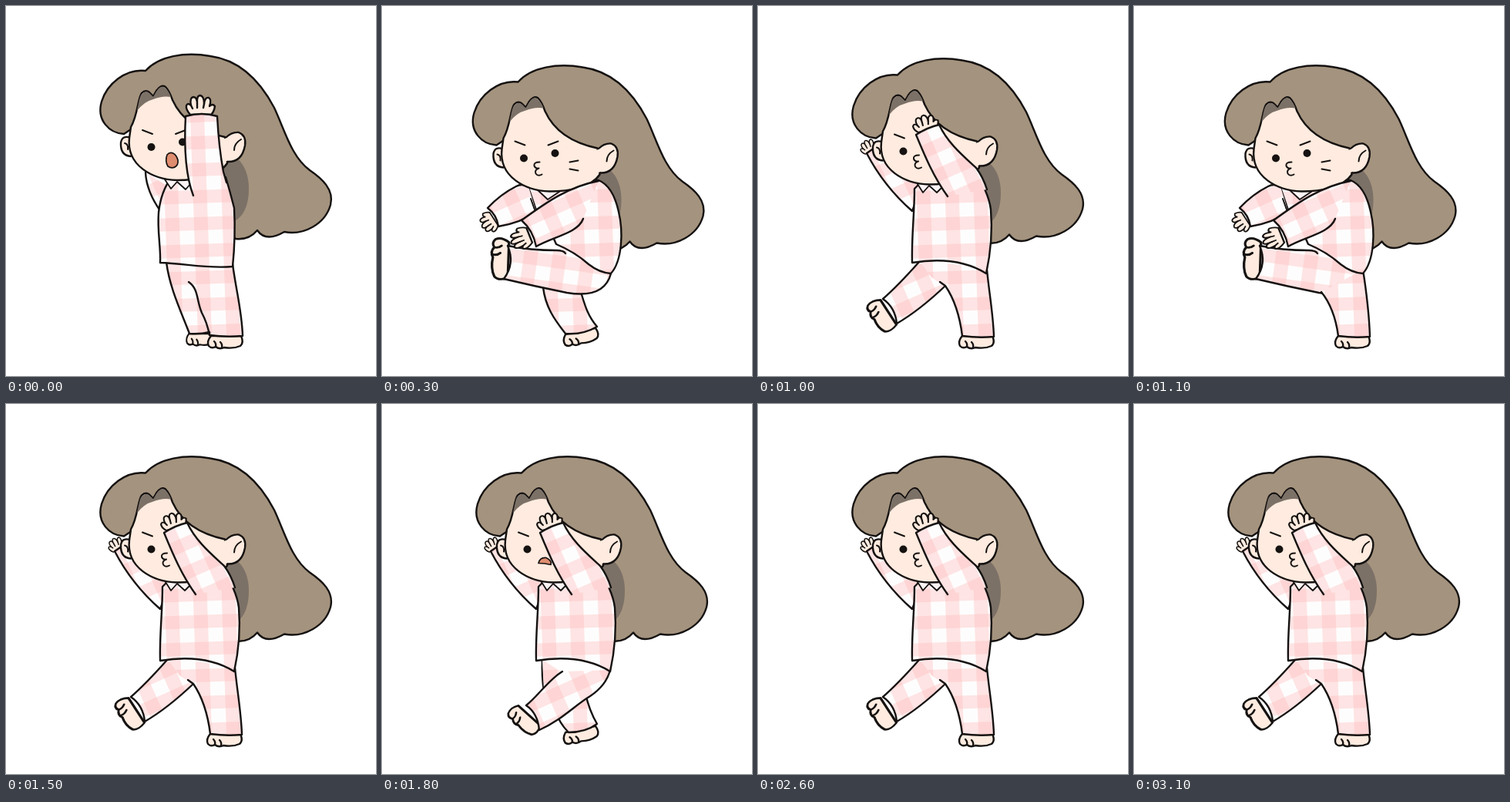
An HTML page that plays this animation: 480 px wide and 480 px high, repeating every 3.2 s.

```html
<!DOCTYPE html>
<html lang="en">
<head>
<meta charset="utf-8">
<title>Pyjama kicks</title>
<style>
html, body { margin: 0; width: 100%; height: 100%; overflow: hidden; background: #fff; }
svg { display: block; width: 100vw; height: 100vh; }
path { fill: none; stroke: #151211; stroke-width: 2.4; stroke-linecap: round; stroke-linejoin: round; }
.hair { fill: #a4937e; }
.shade { fill: #7c7167; stroke: none; }
.skin { fill: #ffebdf; }
.cloth { fill: url(#plaid); }
.tilted { fill: url(#tilted); }
.slanted { fill: url(#slanted); }
.collar { fill: #fdf5f5; stroke-width: 1.8; }
.mouth { fill: #df8d6f; stroke-width: 1.7; }
.thin { stroke-width: 2; }
.bare { stroke: none; }
</style>
</head>
<body>
<svg viewBox="0 0 480 480">
  <defs>
    <pattern id="plaid" width="37" height="35" patternUnits="userSpaceOnUse" patternTransform="translate(12 2) rotate(-2)">
      <rect width="37" height="35" fill="#fefdfd"/>
      <g fill="#ffb8b8" fill-opacity=".37">
        <rect width="18" height="35"/>
        <rect width="37" height="17"/>
      </g>
    </pattern>
    <pattern id="tilted" href="#plaid" patternTransform="translate(8 4) rotate(-24)"/>
    <pattern id="slanted" href="#plaid" patternTransform="translate(4 9) rotate(8)"/>

    <!-- both drawn around the wrist or ankle -->
    <g id="hand">
      <path class="skin" d="M-14 0Q-20-7-19-12Q-17-16-13-12Q-15-22-10-23Q-5-23-5-14Q-6-25-1-25Q4-24 4-14Q5-23 10-22Q14-20 11-11Q15-15 18-11Q17-4 13 0Z"/>
      <path d="M-13-12L-11-8M-5-14V-9M4-14L3-9"/>
    </g>
    <g id="foot">
      <path class="skin" d="M-19 0Q-25 7-22 13Q-18 17-13 14Q-8 18-2 15Q10 17 19 13Q24 9 20 0Z"/>
      <path d="M-15 7Q-12 10-13 14M-7 8Q-4 11-5 15"/>
    </g>
    <g id="kickLeg">
      <use href="#foot" transform="translate(164 329) rotate(92) scale(1.18 1.35)"/>
      <path class="bare slanted" d="M226 305L238 322L297 347L275 325Z"/>
      <path class="slanted" d="M238 321Q236 317 226 317Q192 317 163 311Q173 334 158 354Q200 364 240 372C276 378 292 366 297 347"/>
    </g>
  </defs>

  <g class="head">
    <path class="hair" d="M181 84C155 81 131 101 124 124C117 148 134 165 153 166L162 160L230 240L298 302Q315 304 326 291Q337 307 361 293C386 298 414 283 421 258C426 238 410 224 394 213C370 195 362 162 348 132C328 94 302 70 265 65C232 59 198 65 181 84Z"/>
    <path class="shade" d="M280 191C303 191 315 212 315 237C315 264 304 283 280 283Z"/>
  </g>

  <!-- legs -->
  <g data-on="s">
    <use href="#foot" transform="translate(253 425) scale(.82 .95)"/>
    <use href="#foot" transform="translate(285 428)"/>
    <path class="cloth" d="M208 332C212 365 227 396 238 425Q252 426 264 423L264 427Q285 430 307 428C306 396 299 372 294 335"/>
    <path d="M237 358C250 367 247 382 254 398Q261 411 264 427"/>
  </g>
  <g data-on="A">
    <use href="#foot" transform="translate(257 422) rotate(-12) scale(1.02)"/>
    <path class="cloth" d="M208 332Q207 353 210 372M225 398Q230 414 242 426Q264 426 279 415Q269 398 264 376"/>
    <use href="#foot" transform="translate(191 404) rotate(42) scale(1 1.25)"/>
    <path class="bare cloth" d="M208 332L210 372L234 348Z"/>
    <path class="tilted" d="M234 347C217 357 203 378 187 391Q202 401 204 423C233 410 250 391 270 379Q291 365 296 345"/>
  </g>
  <g data-on="B">
    <use href="#foot" transform="translate(169 397) rotate(57) scale(.98 1.35)"/>
    <use href="#foot" transform="translate(284 428)"/>
    <path class="tilted" d="M209 332C193 350 179 365 162 380Q178 391 180 412C204 398 223 382 243 363"/>
    <path class="bare cloth" d="M209 330L297 340V350L243 364L225 352Z"/>
    <path class="cloth" d="M236 358L243 363C256 382 262 404 265 428Q286 431 306 429C305 398 300 374 297 342"/>
  </g>
  <g data-on="K">
    <use href="#foot" transform="translate(257 422) rotate(-12) scale(1.02)"/>
    <path class="cloth" d="M209 365C212 390 223 406 238 425Q260 427 279 416C266 401 263 387 257 368"/>
    <use href="#kickLeg"/>
  </g>
  <g data-on="k">
    <use href="#kickLeg"/>
    <use href="#foot" transform="translate(284 428)"/>
    <path class="cloth" d="M243 371C256 387 262 406 265 428Q286 431 306 429C305 398 302 374 297 342"/>
  </g>

  <!-- far arm and torso -->
  <g data-on="s">
    <path class="tilted" d="M181 216C182 237 191 253 201 267L212 235"/>
    <path class="cloth" d="M215 222Q201 240 198 268C196 292 201 312 200 333C233 334 260 341 294 338Q298 300 296 262Q291 242 285 222Z"/>
    <path class="collar" d="M206 225L214 237L222 228L233 238L240 230V220H206"/>
  </g>
  <g data-on="AB">
    <use href="#hand" transform="translate(147 188) rotate(-28) scale(.62)"/>
    <path class="tilted" d="M180 212Q166 200 154 182L141 191C156 220 176 245 200 266L212 235"/>
    <path class="cloth" d="M214 226L203 237C203 270 199 300 200 333C231 328 267 329 296 347C303 315 304 288 302 264Q299 240 278 210Z"/>
    <path class="collar" d="M207 231L214 242L222 233L232 242L239 235V226H207"/>
  </g>
  <g data-on="Kk">
    <use href="#hand" transform="translate(145 276) rotate(-123) scale(.74)"/>
    <path class="cloth" d="M188 230L200 265L222 300L226 309Q250 319 268 335Q282 346 297 347C312 330 313 292 307 267C302 244 293 231 281 226Z"/>
    <path class="tilted" d="M190 234Q181 230 174 234Q154 244 137 262Q149 271 151 286Q181 281 200 267"/>
    <path class="thin" d="M193 250L198 264"/>
    <path class="collar" d="M200 237L215 251L230 241"/>
  </g>

  <g class="head">
    <path class="skin" d="M162 171Q151 167 149 177Q148 194 162 195"/>
    <path class="thin" d="M154 178Q159 179 158 186"/>
    <path class="skin" d="M285 171Q293 163 302 164Q312 168 310 181Q306 203 287 202"/>
    <path class="thin" d="M305 173Q296 178 296 187"/>
    <path class="skin" d="M160 171L162 157C171 142 171 119 176 113Q181 108 186 112L191 117L195 110Q201 101 207 105Q212 110 216 122C226 144 246 162 284 170L287 204C276 221 246 226 222 226C190 225 156 207 160 171Z"/>
    <path class="bare skin" d="M280 173L291 170V199L280 204Z"/>
    <path class="shade" d="M170 136C173 121 174 115 177 114Q181 109 186 113L191 118L195 111Q201 102 206 106Q211 110 214 118Q203 116 191 121Q179 124 170 136Z"/>
    <circle cx="188.5" cy="183" r="5" fill="#151211"/>
    <circle cx="229" cy="176.5" r="5" fill="#151211"/>
    <path class="thin" d="M177 161L190 166M220 166L233 161"/>
    <path data-on="s" class="mouth" d="M209 193C214 187 221 192 223 200C224 209 216 212 210 208Q206 201 209 193Z"/>
    <path data-on="A" class="mouth" d="M203 201Q205 193 213 194Q221 198 219 203Q211 201 203 201Z"/>
    <path data-on="BKk" class="thin" d="M209 188Q201 188 202 193Q204 197 208 196Q202 198 204 203Q207 207 212 204"/>
    <path data-on="Kk" class="thin" d="M248 188L259 186M248 197L259 199"/>
  </g>

  <!-- near arm -->
  <g data-on="s">
    <use href="#hand" transform="translate(253 141)"/>
    <path class="cloth" d="M243 246C233 220 231 180 233 143Q254 137 274 143Q276 183 282 215L286 229"/>
  </g>
  <g data-on="AB">
    <use href="#hand" transform="translate(220 161) rotate(-14) scale(.9 .8)"/>
    <path class="tilted" d="M246 247C228 222 217 196 205 167Q221 157 235 154C246 178 268 196 283 210Q292 222 297 238"/>
  </g>
  <g data-on="Kk">
    <use href="#hand" transform="translate(191 297) rotate(-112) scale(.76 1.03)"/>
    <path class="tilted" d="M281 227C243 234 214 254 181 278Q196 291 200 312C222 299 254 295 261 276"/>
  </g>
</svg>
<script>
// One letter per 100 ms: s stand, A/B wind-up, K/k kick with near/far leg
const beats = 'ssAKKKKAssBkkkkB';
const headAt = { s: '0 0', A: '0 5.5', B: '0 5.5', K: '-4.5 14.5', k: '-4.5 14.5' };
const heads = document.querySelectorAll('.head');
const parts = document.querySelectorAll('[data-on]');
let shown;

function show(pose) {
  if (pose === shown) return;
  shown = pose;
  heads.forEach(h => h.setAttribute('transform', `translate(${headAt[pose]})`));
  parts.forEach(p => p.style.display = p.dataset.on.includes(pose) ? '' : 'none');
}

function tick() {
  show(beats[Math.floor(performance.now() / 100) % beats.length]);
  requestAnimationFrame(tick);
}
tick();
</script>
</body>
</html>
```
